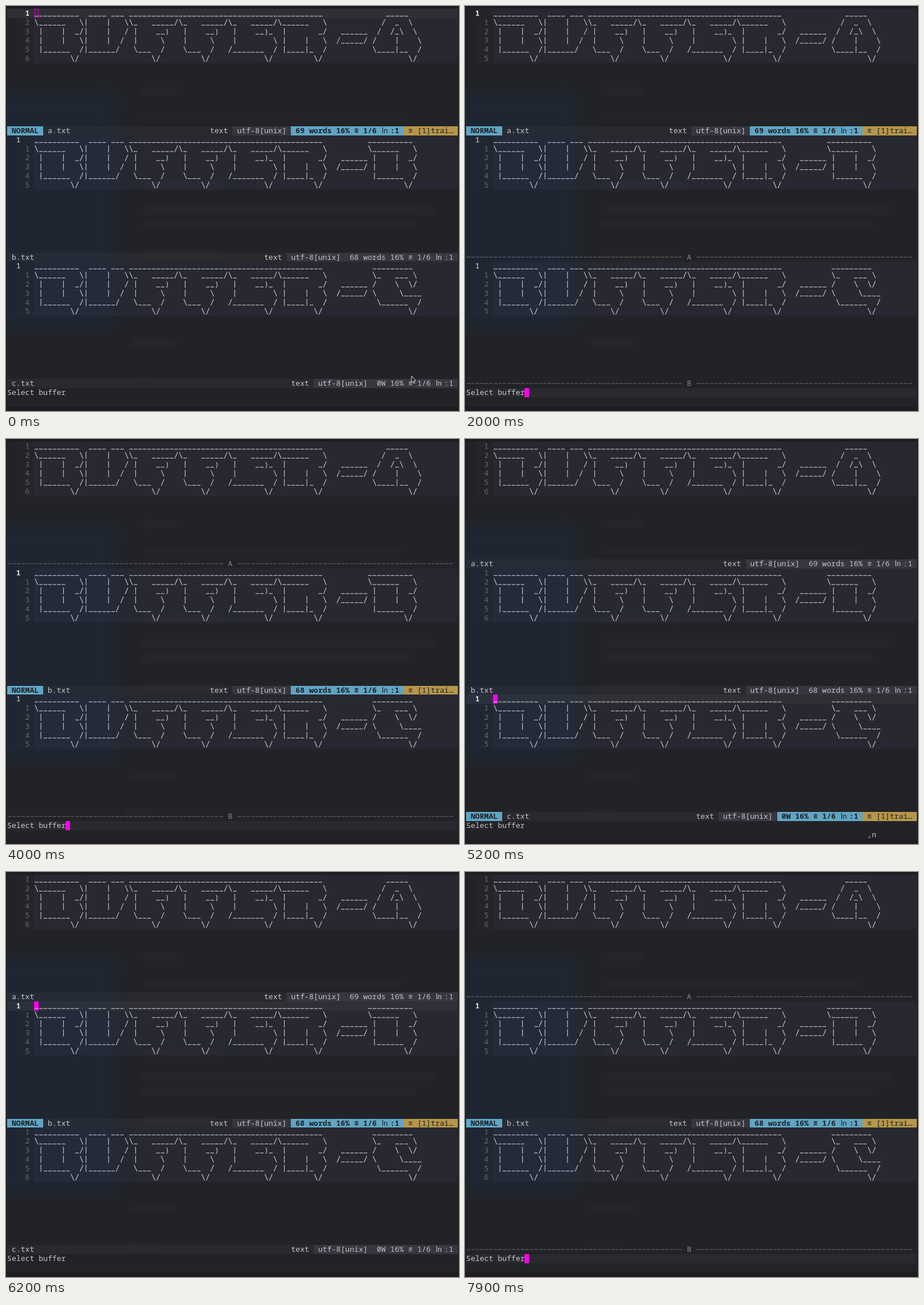
An HTML page with a canvas for the animation above (8 s loop, 792x707 px).

```html
<!DOCTYPE html>
<html lang="en">
<head>
<meta charset="utf-8">
<title>Select buffer</title>
<style>
html, body { margin: 0; width: 100%; height: 100%; overflow: hidden; background: #222327; }
canvas { display: block; }
</style>
</head>
<body>
<canvas id="stage" width="792" height="707"></canvas>
<script>
const ctx = document.getElementById('stage').getContext('2d');
const W = 792, H = 707, LOOP = 8000;
const CW = 7.88, RH = 15.76, X0 = 2, Y0 = 5.1;
const FONT = '13.13px "Noto Sans Mono", "DejaVu Sans Mono", monospace';

const C = {
  bg: '#222327', ink: '#c6c7c9', dim: '#66686f', bright: '#e2e3e5',
  blue: '#60a5c3', gold: '#b6964a', dark: '#1d2026', pink: '#ff00ee',
  panel: 'rgba(70,72,86,.45)', lines: 'rgba(52,54,78,.28)',
  cursorLine: 'rgba(80,82,90,.28)', bar: 'rgba(60,62,70,.25)'
};

const LETTERS = {
  B: ['__________', '\\______   \\', ' |    |  _/', ' |    |   \\', ' |______  /', '        \\/'],
  U: [' ____ ___', '|    |   \\', '|    |   /', '|    |  /', '|______/', ''],
  F: ['___________', '\\_   _____/', ' |    __)', ' |     \\', ' \\___  /', '     \\/'],
  E: ['___________', '\\_   _____/', ' |    __)_', ' |        \\', '/_______  /', '        \\/'],
  R: ['__________', '\\______   \\', ' |       _/', ' |    |   \\', ' |____|_  /', '        \\/'],
  '-': ['', '', '  ______', ' /_____/', '', ''],
  A: ['   _____', '  /  _  \\', ' /  /_\\  \\', '/    |    \\', '\\____|__  /', '        \\/'],
  C: ['_________', '\\_   ___ \\', '/    \\  \\/', '\\     \\____', ' \\______  /', '        \\/']
};
const WORD = [['B', 0], ['U', 11], ['F', 21], ['F', 32], ['E', 43], ['R', 54], ['-', 66]];

const PANES = [
  { file: 'a.txt', top: 0, bar: 13, count: '69 words', last: ['A', 75] },
  { file: 'b.txt', top: 14, bar: 27, count: '68 words', last: ['B', 74] },
  { file: 'c.txt', top: 28, bar: 41, count: '0W', last: ['C', 75] }
];

// [start ms, active pane, choosing, pending keys]
const STEPS = [
  [0, 0, false, ''], [1000, 0, false, ','], [1500, 0, false, ',n'], [1700, 0, true, ''],
  [2500, 1, false, ''], [3300, 1, false, ','], [3600, 1, false, ',n'], [3700, 1, true, ''],
  [4500, 2, false, ''], [4900, 2, false, ','], [5200, 2, false, ',n'], [5300, 2, true, ''],
  [6100, 1, false, ''], [6500, 1, false, ','], [6800, 1, false, ',n'], [6900, 1, true, '']
];
const FOCUS_AT = 100, POINTER_OFF = 1000;

const colX = c => X0 + c * CW;
const rowY = r => Y0 + r * RH;

function fill(col, row, n, color) {
  ctx.fillStyle = color;
  const x = Math.round(colX(col)), y = Math.round(rowY(row));
  ctx.fillRect(x, y, Math.round(colX(col + n)) - x, Math.round(rowY(row + 1)) - y);
}

function text(col, row, str, color, bold) {
  ctx.fillStyle = color;
  ctx.font = (bold ? '600 ' : '') + FONT;
  [...str].forEach((ch, i) => {
    if (ch !== ' ') ctx.fillText(ch, colX(col + i), rowY(row) + 12.1);
  });
}

function stroke(x1, y1, x2, y2) {
  ctx.beginPath();
  ctx.moveTo(x1, y1);
  ctx.lineTo(x2, y2);
  ctx.stroke();
}

function art(col, row, str) {
  ctx.strokeStyle = C.ink;
  ctx.lineWidth = 1.15;
  [...str].forEach((ch, i) => {
    const x = colX(col + i), y = rowY(row);
    if (ch === '_') stroke(x + .8, y + 12.6, x + 7.1, y + 12.6);
    else if (ch === '|') stroke(x + 3.94, y + 1.6, x + 3.94, y + 14);
    else if (ch === '/') stroke(x + 6.4, y + 2, x + 1.5, y + 13.4);
    else if (ch === '\\') stroke(x + 1.5, y + 2, x + 6.4, y + 13.4);
    else text(col + i, row, ch, C.ink);
  });
}

function makeBackdrop() {
  const layer = document.createElement('canvas');
  layer.width = W;
  layer.height = H;
  const g = layer.getContext('2d');
  g.fillStyle = C.bg;
  g.fillRect(0, 0, W, H);
  g.filter = 'blur(12px)';
  g.fillStyle = 'rgba(29,42,60,.55)';
  g.fillRect(-30, 150, 222, 410);
  g.filter = 'blur(5px)';
  g.fillStyle = 'rgba(50,48,46,.3)';
  [[237, 142, 74, 14], [237, 190, 460, 9], [240, 306, 140, 17], [237, 350, 515, 14],
   [237, 376, 480, 14], [237, 426, 140, 18], [216, 580, 84, 14], [210, 646, 58, 12]]
    .forEach(b => g.fillRect(...b));
  g.filter = 'none';
  g.fillStyle = '#1c1d20';
  g.fillRect(0, 0, W, 4);
  g.fillRect(0, 0, 1, H);
  g.fillRect(791, 0, 1, H);
  g.fillStyle = '#211c1f';
  g.fillRect(0, 699, W, 8);
  return layer;
}
const backdrop = makeBackdrop();

function numbers(pane, mode, lit) {
  for (let i = 0; i < 6; i++) {
    const current = i === 0 && mode !== 'plain';
    const n = mode === 'relative' && i ? i : i + 1;
    const col = current && mode === 'relative' ? 2 : 4;
    text(col, pane.top + i, String(n), current ? C.bright : C.dim, current && lit);
  }
}

function position(col, row, count, color, bold) {
  const str = count + ' 16% ≡ 1/6 ';
  text(col, row, str, color, bold);
  const c = col + str.length;
  ctx.font = '13px Roboto, sans-serif';
  ctx.fillText('ln', colX(c) + 1, rowY(row) + 12.1);
  text(c + 2, row, ':1', color, bold);
}

function statusBar(pane, active) {
  const r = pane.bar, n = pane.count.length;
  fill(0, r, 100, C.bar);
  if (!active) {
    const c = 70 - n;
    text(1, r, pane.file, C.ink);
    text(c - 5, r, 'text', C.ink);
    fill(c, r, 100 - c, C.panel);
    text(c + 1, r, 'utf-8[unix]', C.ink);
    position(c + 14, r, pane.count, C.ink);
    return;
  }
  const c = 71 - n;
  fill(0, r, 8, C.blue);
  text(1, r, 'NORMAL', C.dark, true);
  text(9, r, pane.file, C.ink);
  text(c - 26 + 13, r, '', C.ink);
  text(c - 18, r, 'text', C.ink);
  fill(c - 13, r, 13, C.panel);
  text(c - 12, r, 'utf-8[unix]', C.ink);
  fill(c, r, 88 - c, C.blue);
  position(c + 1, r, pane.count, C.dark, true);
  fill(88, r, 12, C.gold);
  text(89, r, '≡ [1]trai…', C.dark);
}

function labelBar(row, label) {
  ctx.strokeStyle = C.dim;
  ctx.lineWidth = 1.1;
  const y = rowY(row) + 7.7;
  for (let i = 0; i < 99; i++) {
    if (i < 48 || i > 50) stroke(colX(i) + .9, y, colX(i) + 7, y);
  }
  text(49, row, label, '#888a91');
}

function pointer() {
  ctx.beginPath();
  [[709, 646], [709, 657], [711.5, 655], [713.3, 659], [715, 658.2], [713.2, 654.3], [716.4, 654]]
    .forEach(p => ctx.lineTo(...p));
  ctx.closePath();
  ctx.fillStyle = '#15161a';
  ctx.fill();
  ctx.strokeStyle = '#e4e4e4';
  ctx.lineWidth = 1;
  ctx.stroke();
}

function cursorBox(col, row, focused) {
  if (focused) return fill(col, row, 1, C.pink);
  ctx.strokeStyle = '#c800bc';
  ctx.lineWidth = 1.2;
  ctx.strokeRect(Math.round(colX(col)) + 1, Math.round(rowY(row)) + .5, 6.5, 14.5);
}

function draw(step, focused, showPointer) {
  const [, active, choosing, keys] = STEPS[step];
  const left = new Set(STEPS.slice(0, step).map(s => s[1]));
  ctx.drawImage(backdrop, 0, 0);

  let label = 0;
  PANES.forEach((pane, i) => {
    const on = i === active;
    for (let r = 0; r < 6; r++) {
      const lit = on && !choosing && r === 0;
      fill(lit ? 0 : 6, pane.top + r, lit ? 100 : 94, lit ? C.cursorLine : C.lines);
      if (!lit) fill(2, pane.top + r, 4, 'rgba(50,52,60,.12)');
    }
    if (on && !choosing) cursorBox(6, pane.top, focused);
    const mode = on ? (focused ? 'relative' : 'absolute') : left.has(i) ? 'plain' : 'relative';
    numbers(pane, mode, on);
    [...WORD, pane.last].forEach(([ch, col]) =>
      LETTERS[ch].forEach((line, r) => art(6 + col, pane.top + r, line)));
    if (choosing && !on) labelBar(pane.bar, 'AB'[label++]);
    else statusBar(pane, on);
  });

  if (choosing) {
    fill(0, 42, 100, 'rgba(70,72,80,.2)');
    cursorBox(13, 42, true);
  }
  text(0, 42, 'Select buffer', C.ink);
  text(89, 43, keys, C.ink);
  if (showPointer) pointer();
}

let shown = '';
function tick(now) {
  const t = now % LOOP;
  let step = STEPS.length - 1;
  while (STEPS[step][0] > t) step--;
  const focused = t >= FOCUS_AT, showPointer = t < POINTER_OFF;
  const key = [step, focused, showPointer].join();
  if (key !== shown) {
    draw(step, focused, showPointer);
    shown = key;
  }
  requestAnimationFrame(tick);
}
const start = performance.now();
const run = () => {
  tick = (base => now => base(Math.max(0, now - start)))(tick);
  requestAnimationFrame(tick);
};
run();
</script>
</body>
</html>
```
